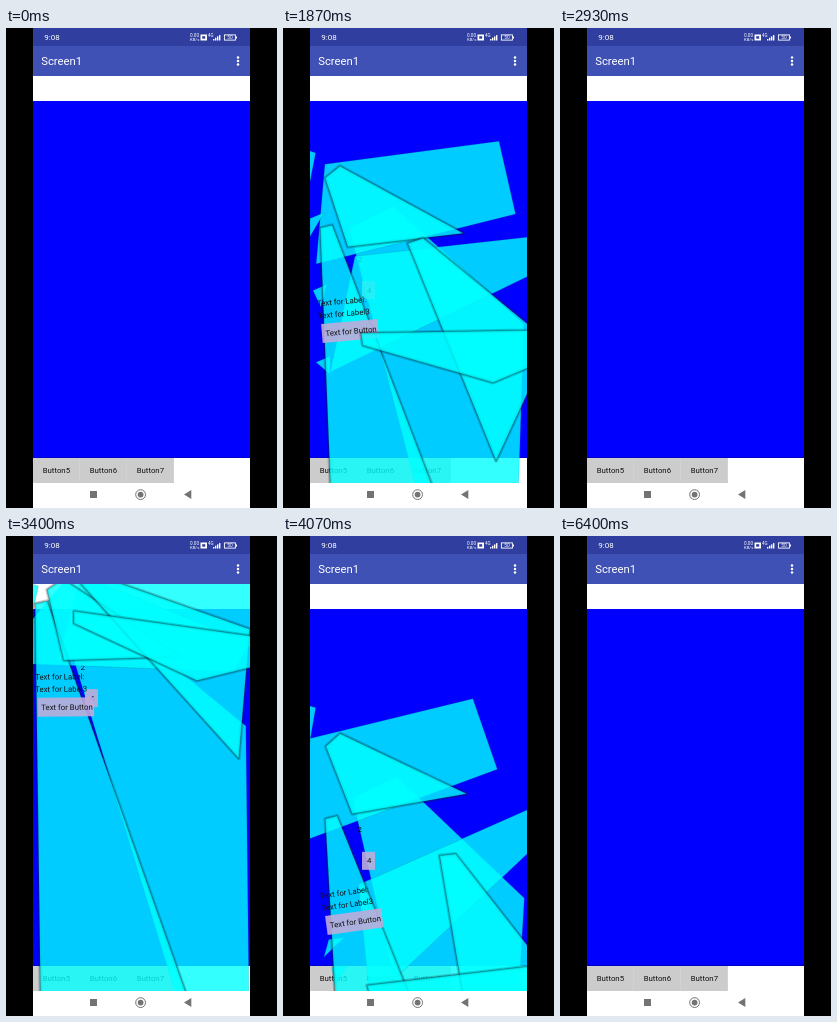
Animation of 271x480 px, one loop 6470 ms. Source, as an HTML page with a canvas:

```html
<!DOCTYPE html>
<html lang="en">
<head>
<meta charset="utf-8">
<title>Breaking panel</title>
<style>
html, body { margin: 0; width: 100%; height: 100%; overflow: hidden; background: #000; }
canvas { display: block; width: 271px; height: 480px; }
</style>
</head>
<body>
<canvas id="stage"></canvas>
<script>
const W = 271, H = 480, LOOP = 6470;
const BREAKS = [1130, 3130], CRACK = 0.2, LIFE = 1.87;
const GLASS = 'rgba(0,255,255,0.8)', PINK = 'rgba(190,172,218,0.9)';
const canvas = document.getElementById('stage');
const c = canvas.getContext('2d');
const dpr = window.devicePixelRatio || 1;
canvas.width = W * dpr;
canvas.height = H * dpr;

const rad = deg => deg * Math.PI / 180;

// A shard is a fan of rays [angle, length] around its tip. It stands here at
// fall = 1; drift, drop and spin are per unit of fall.
function shard(x, y, rays, drift, drop, spin, lifted = false) {
  const pts = rays.map(([a, r]) => [r * Math.cos(rad(a)), r * Math.sin(rad(a))]);
  return { x, y, pts: [[0, 0], ...pts], drift, drop, spin, lifted };
}

const body = shard(110, 178, [[42, 176], [74, 439], [82, 426], [153, 49]], 6, 100, 2.5);
const slab = shard(42, 136, [[-7.5, 175.5], [14.7, 197], [95, 100]], -36, 109, -10);
const band = shard(72, 228, [[-6.3, 191], [3.6, 190], [102, 118]], 6, 192, -28);
const left = shard(49, 197, [[69, 431], [89.4, 403], [166, 12]], 8, 132, -1.5, true);
const wedge = shard(57, 138, [[28.6, 140], [84.4, 81], [141, 19]], 0, 95, -5, true);
const blade = shard(140, 210, [[39.4, 165], [71.8, 234], [161, 16]], 52, 172, 20, true);
const sliver = shard(78, 305, [[-1, 260], [20.4, 141], [81, 12]], 10, 230, -9, true);
const chip = shard(24, 122, [[18, 9], [87, 37]], 0, 75, -2);
const crumbs = Array.from({ length: 3 }, (_, i) =>
  shard(27 + 3 * i, 190 + 72 * i, [[-23, 15], [90 - 25 * i, 18]], 30, 340 - 70 * i, 25));
const shards = [body, slab, band, chip, ...crumbs, left, wedge, blade, sliver];

function rect(color, x, y, w, h) {
  c.fillStyle = color;
  c.fillRect(x, y, w, h);
}

function text(s, x, y, size, color = '#111') {
  c.font = size + 'px Roboto, Inter, sans-serif';
  c.fillStyle = color;
  c.fillText(s, x, y);
}

function dot(x, y, r) {
  c.beginPath();
  c.arc(x, y, r, 0, 7);
}

function path(pts) {
  c.beginPath();
  pts.forEach(([x, y]) => c.lineTo(x, y));
  c.closePath();
}

function statusBar() {
  rect('#303f9f', 27, 0, 217, 18);
  rect('#3f51b5', 27, 18, 217, 30);
  text('9:08', 38.3, 12.3, 8, '#fff');
  text('0.00', 184, 8.8, 4.7, '#fff');
  text('KB/s', 184, 12.8, 4.3, '#fff');
  rect('#fff', 194.5, 6.5, 6.5, 6);
  rect('#303f9f', 196.2, 8.2, 3, 2.5);
  text('4G', 202, 9.2, 4.5, '#fff');
  for (let i = 0; i < 4; i++) rect('#fff', 207 + i * 2, 11 - i * 1.3, 1.4, 1.5 + i * 1.3);
  c.strokeStyle = '#fff';
  c.lineWidth = 0.9;
  c.strokeRect(218.4, 6.9, 11, 5.2);
  rect('#fff', 230, 8.5, 1, 2);
  text('50', 221.3, 11.3, 4.8, '#fff');
  text('Screen1', 35.2, 37, 11.3, '#fff');
  c.fillStyle = '#fff';
  for (let i = -1; i <= 1; i++) {
    dot(232, 33 + 3.5 * i, 1.25);
    c.fill();
  }
}

function navBar() {
  rect('#fff', 27, 455, 217, 25);
  rect('#737373', 84, 463, 7, 7);
  c.strokeStyle = '#737373';
  c.lineWidth = 1;
  dot(134.6, 466.6, 4.9);
  c.stroke();
  dot(134.6, 466.6, 2.9);
  c.fill();
  path([[178, 466.5], [185.3, 462], [185.3, 471]]);
  c.fill();
}

function screen() {
  rect('#000', 0, 0, W, H);
  rect('#fff', 27, 48, 217, 432);
  rect('#00f', 27, 73, 217, 357);
  rect('#0000cd', 27, 429, 217, 1);
  for (let i = 0; i < 3; i++) {
    const x = 27 + i * 47;
    rect('#ccc', x, 430, 47, 25);
    rect('#d4d4d4', x + 46.3, 431, 0.7, 23);
    text('Button' + (i + 5), x + 9.7, 445.2, 7.8);
  }
}

function drawShard(s, p) {
  const m = p - 1;
  c.save();
  c.translate(s.x + s.drift * m, s.y + s.drop * m);
  c.rotate(rad(s.spin * m));
  path(s.pts);
  c.lineJoin = 'round';
  if (s.lifted) {
    c.strokeStyle = 'rgba(0,30,40,0.2)';
    for (let w = 4; w >= 1; w /= 2) {
      c.lineWidth = w;
      c.stroke();
    }
  }
  c.fillStyle = GLASS;
  c.fill();
  c.strokeStyle = 'rgba(0,100,115,0.3)';
  c.lineWidth = 0.6;
  c.stroke();
  c.restore();
}

// Ends of the hidden rows, carried by the large piece.
function rowEnds(p) {
  const y = 162 + 100 * p;
  rect(PINK, 79, y - 9, 13, 18);
  text('4', 84, y + 2.5, 7.8);
  text('2', 74.5, y - 28.5, 7.8);
}

function labels(p) {
  c.save();
  c.translate(30 + 5 * p, 143.5 + 134.5 * p);
  c.rotate(-rad(0.5 + 4.5 * p));
  c.beginPath();
  c.rect(-3, -12, 61, 60);
  c.clip();
  text('Text for Label:', -0.8, 0, 7.8);
  text('Text for Label3', -0.8, 12.3, 7.8);
  rect(PINK, 1.5, 18, 57, 19);
  text('Text for Button', 5, 30.5, 7.8);
  c.restore();
}

// Rays growing from the touch point.
function cracks(k) {
  c.strokeStyle = 'rgba(0,40,50,0.5)';
  c.lineWidth = 0.8;
  for (let i = 0; i < 7; i++) {
    const a = rad(5 + 14.5 * i), r = 420 * k;
    c.beginPath();
    c.moveTo(48, 58);
    c.lineTo(48 + r * Math.cos(a), 58 + r * Math.sin(a));
    c.stroke();
  }
}

function panel(age) {
  c.save();
  c.beginPath();
  c.rect(27, 48, 217, 407);
  c.clip();
  if (age < CRACK) {
    rect(GLASS, 27, 48, 217, 407);
    labels(0);
    cracks(age / CRACK);
  } else {
    const u = age - 0.27, p = 1.42 * u + 1.5 * u * u;
    for (const s of shards) {
      drawShard(s, p);
      if (s === body) rowEnds(p);
      if (s === left) labels(p);
    }
  }
  c.restore();
}

function frame(now) {
  const t = now % LOOP;
  c.setTransform(dpr, 0, 0, dpr, 0, 0);
  screen();
  for (const start of BREAKS) {
    const age = (t - start) / 1000;
    if (age >= 0 && age < LIFE) panel(age);
  }
  statusBar();
  navBar();
  requestAnimationFrame(frame);
}
requestAnimationFrame(frame);
</script>
</body>
</html>
```
